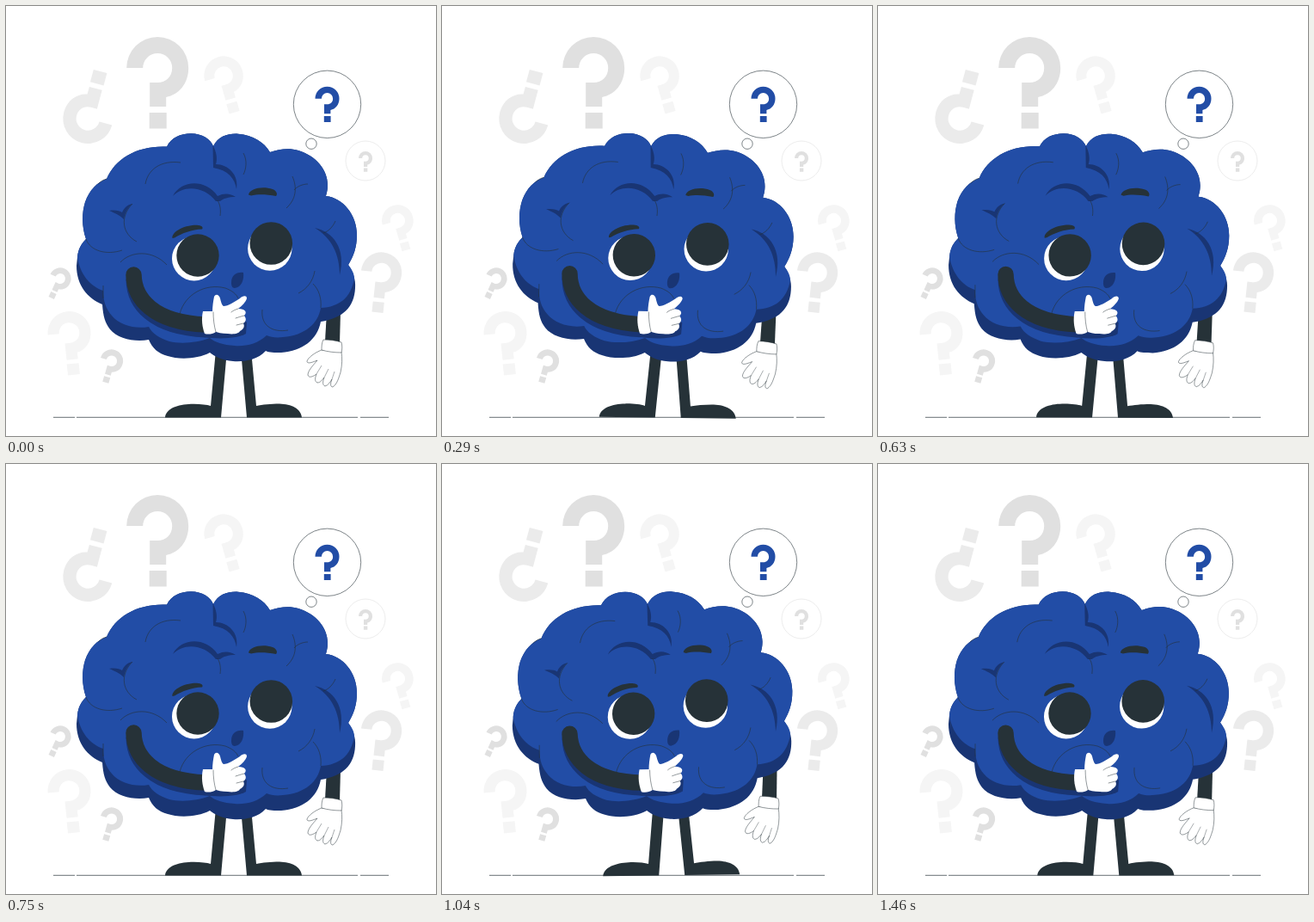
Write an HTML page with a canvas that moves like this. It is 500 by 500 pixels and loops after 1500 ms.

```html
<!DOCTYPE html>
<html lang="en">
<head>
<meta charset="utf-8">
<title>Thinking brain</title>
<style>
html, body { margin: 0; width: 100%; height: 100%; overflow: hidden; background: #fff; }
canvas { display: block; width: 500px; height: 500px; }
</style>
</head>
<body>
<canvas id="stage" width="500" height="500"></canvas>
<script>
const ctx = document.getElementById('stage').getContext('2d');
const BLUE = '#224da6', SHADE = '#193574', INK = '#263238', WHITE = '#fff';
const LOOP = 1500, FPS = 24;

function fill(d, color) {
  ctx.fillStyle = color;
  ctx.fill(new Path2D(d));
}

function stroke(d, color, width) {
  ctx.strokeStyle = color;
  ctx.lineWidth = width;
  ctx.stroke(new Path2D(d));
}

function outlined(d) {
  fill(d, WHITE);
  stroke(d, INK, 0.5);
}

function disc(x, y, r, color, line) {
  ctx.beginPath();
  ctx.arc(x, y, r, 0, Math.PI * 2);
  ctx.fillStyle = color;
  ctx.fill();
  if (line) {
    ctx.strokeStyle = line;
    ctx.lineWidth = 0.6;
    ctx.stroke();
  }
}

// Question mark placed by the centre and radius of its bowl.
const MARK = 'M-36 0A36 36 0 0 1 36 0C36 18 25 31 10 34V45H-9V17H0C10 17 17 10 17 0A17 17 0 0 0-17 0Z'
  + 'M-9.5 52H10.5V70.5H-9.5Z';

function question(x, y, r, degrees, color) {
  ctx.save();
  ctx.translate(x, y);
  ctx.rotate(degrees * Math.PI / 180);
  ctx.scale(r / 36, r / 36);
  fill(MARK, color);
  ctx.restore();
}

function drawBackground() {
  ctx.fillStyle = WHITE;
  ctx.fillRect(0, 0, 500, 500);

  question(176.2, 72, 36, 0, '#e0e0e0');
  question(95.3, 131, 29, 195, '#ebebeb');
  question(253, 81, 22.7, -16, '#f5f5f5');
  question(455.3, 249.5, 18.3, -16, '#f5f5f5');
  question(436.5, 310, 23.7, 6, '#ebebeb');
  question(63, 317, 12.6, 25, '#e0e0e0');
  question(73.5, 380, 25, -6, '#f5f5f5');
  question(122.8, 412.7, 13.3, 16, '#e0e0e0');

  disc(373.5, 114.3, 39.2, WHITE, INK);
  question(373.5, 107.7, 14, 0, BLUE);
  disc(355, 160.2, 6.2, WHITE, INK);
  disc(418, 180, 23, WHITE, '#e0e0e0');
  question(418, 177, 8, 0, '#e0e0e0');

  stroke('M55 478.3H80M82 478.3H409M412 478.3H445', INK, 0.7);
}

const CROWN = 'M83 292C84 282 88 276 93 271C88 256 88 241 92 228C97 214 106 205 117 201'
  + 'C127 177 153 162 187 163.5C192 153 203 148.3 215 148.3C228 148.3 238 155 241 163'
  + 'C247 151 259 148 270 148.7C287 150 300 158 307 170C318 166 330 165 340 168'
  + 'C360 174 374 190 374 208C374 214 373 217 372 221C392 223 408 243 408 266'
  + 'C408 281 404 291 398 301';

const BASE = CROWN + 'C403 308 407 318 406 328C405 350 392 363 366 367'
  + 'C362 388 345 401 320 403C312 403 306 403 302 401C292 412 275 414 264 413'
  + 'C252 412 243 408 237 403C222 411 200 411 188 407C177 404 170 398 166 388'
  + 'C150 391 130 387 121 376C115 368 113 361 112 347C95 340 82 325 82 302Z';

const BODY = CROWN + 'C402 306 405 311 405 317C401 339 388 350 366 351'
  + 'C363 369 348 383 322 385C314 386 308 385 303 383C293 393 278 396 266 395'
  + 'C252 394 243 391 237 386C222 392 202 393 190 390C178 386 170 381 166 373'
  + 'C150 376 132 371 123 360C116 352 113 343 113 331C98 326 86 312 83 292Z';

const CREASES = 'M240.5 162C245 170 246 178 244 184C258 184 271 196 268 213C266 200 258 191 241 188Z'
  + 'M194 221C203 203 231 200 246 221C254 217 261 218 267 222C259 222 252 224 249 227L244 227C232 210 207 207 194 221Z'
  + 'M120 238C127 237 132 238 135 240C137 235 141 231 147 230C139 237 138 243 137 248C132 243 127 241 120 238Z'
  + 'M359 258C380 262 396 282 388 313C388 289 379 270 359 258Z'
  + 'M262 322C262 313 268 309 276 310C277 318 274 327 266 328C263 328 262 325 262 322Z';

const FOLDS = 'M162 207C165 190 180 179 203 182M276 171C281 180 279 190 276 196'
  + 'M351 207C345 207 338 210 335 214M333 198C339 212 337 225 326 235'
  + 'M93 271C98 285 117 290 135 284M133 298C145 285 170 283 187 301'
  + 'M147 230C132 245 135 265 152 274M246 226C249 231 250 237 249 244'
  + 'M383 250C380 257 375 262 369 264M113 325V340'
  + 'M202 358C208 335 232 322 255 328C263 331 268 335 270 340'
  + 'M298 353C296 372 310 380 328 377M340 334C350 329 357 320 359 308'
  + 'M366 351C367 340 364 330 357 323M117 201C113 202 110 204 107 207';

function drawLimbsBehind() {
  fill('M244 400H257L250 478.5H185C186 468 200 463.3 215 462.8C225 462.5 233 463.5 238 465Z', INK);
  fill('M273 400H285L291 465C298 463.5 308 462.5 318 462.5C332 463 343 468 344 478.5H280Z', INK);

  fill('M373 355H389L388 392L371 390Z', INK);
  outlined('M367 400C359 403 351 409 350 413C350 417 357 414 362 412C357 418 351 424 351 429'
    + 'C352 433 357 431 361 428C359 433 359 437 362 438C366 438 368 434 370 432'
    + 'C368 437 368 441 371 442C375 441 377 437 379 434C377 439 377 443 380 443'
    + 'C385 440 387 432 389 426C391 417 391 409 390 402Z');
  stroke('M361 428L367 418M370 432L375 422M379 434L382 425', INK, 0.4);
  outlined('M369 388C376 388 384 389 390 391C391 395 391 399 390 403C382 403 374 402 367 400C367 396 367 392 369 388Z');
}

function drawFace() {
  disc(218.7, 293.7, 25.7, WHITE);
  disc(223, 290, 24.7, INK);
  disc(306.8, 282, 25.7, WHITE);
  disc(308.3, 276, 24.8, INK);
  fill('M193.5 270C192 264 205 254.5 222 254.7C227 255 230 257 228 259.5C216 260 205 264 196 269.5Z', INK);
  fill('M282 219.5C283 212.5 298 209 310 213C315 215 316 219 314 221C303 219 293 218.5 285 220.5Z', INK);
}

function drawThinkingArm() {
  const arm = 'M148.5 312.5C149 340 171 368 232 370.5';
  ctx.lineCap = 'round';
  ctx.save();
  ctx.translate(0, 6);
  stroke(arm, SHADE, 18);
  fill('M230 352H270L280 362L279 375C271 380 250 382 230 379Z', SHADE);
  ctx.restore();
  stroke(arm, INK, 18.4);

  fill('M240 356C240 349 241 343 242 338C244 334 248 336 249 340C250 344 251 348 253 349'
    + 'C258 349 266 344 272 340C275 337 280 336 280 340C279 344 274 349 270 352'
    + 'C278 352 281 356 277 360C280 364 279 367 276 369C278 373 276 376 272 378'
    + 'C271 381 264 382 258 381C251 381 246 380 242 378Z', WHITE);
  fill('M229 355H241L244 379C240 382 234 382 231 381C228 373 227 364 229 355Z', WHITE);
  stroke('M241 356C241 364 242 372 244 379M270 352C267 353 264 354 262 356M277 360C273 361 270 362 267 363M276 369L268 371', INK, 0.5);
  ctx.lineCap = 'butt';
}

function drawCharacter(degrees) {
  ctx.save();
  ctx.translate(245, 314);
  ctx.rotate(degrees * Math.PI / 180);
  ctx.translate(-245, -314);
  drawLimbsBehind();
  fill(BASE, SHADE);
  fill(BODY, BLUE);
  fill(CREASES, SHADE);
  stroke(FOLDS, INK, 0.6);
  drawFace();
  drawThinkingArm();
  ctx.restore();
}

// Linear sway: 0 to 1 to -1 to 0 degrees.
function sway(p) {
  if (p < 0.25) return p * 4;
  return p < 0.75 ? 2 - p * 4 : p * 4 - 4;
}

function render(now) {
  const seconds = (now % LOOP) / 1000;
  const stepped = Math.floor(seconds * FPS + 0.1) / FPS;
  drawBackground();
  drawCharacter(sway((stepped * 1000 / LOOP) % 1));
  requestAnimationFrame(render);
}

render(performance.now());
</script>
</body>
</html>
```
